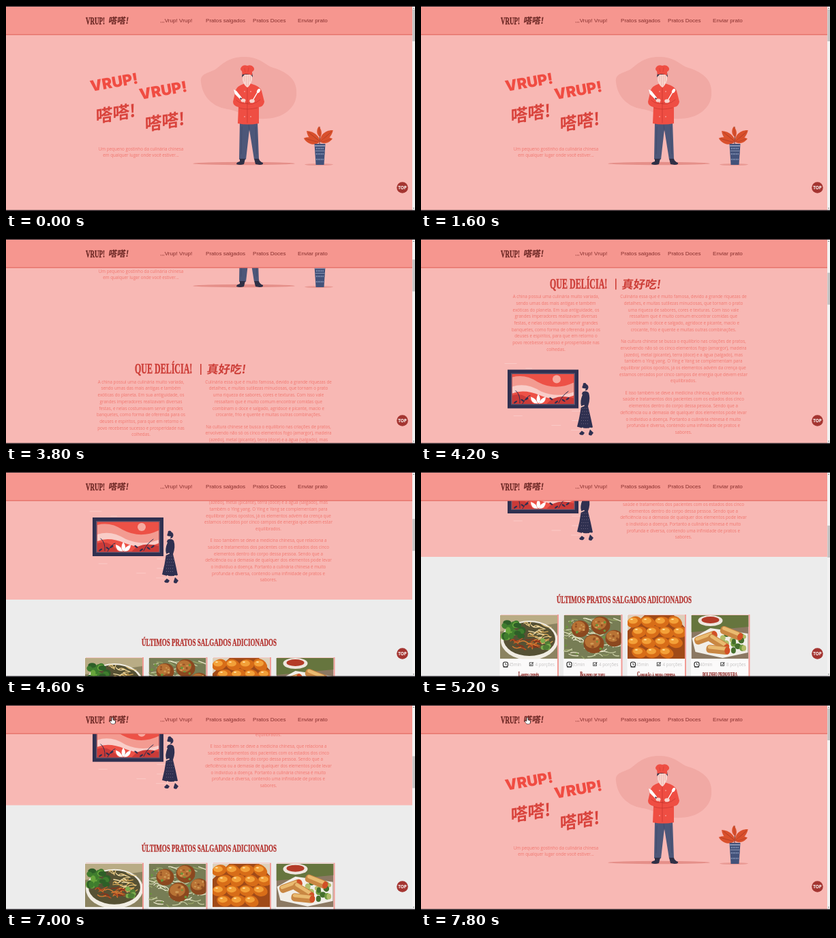
An HTML page for the animation above (8000 ms loop, 600 px wide and 302 px high).

```html
<!DOCTYPE html>
<html lang="pt">
<head>
<meta charset="utf-8">
<style>
html, body { margin: 0; width: 100%; height: 100%; overflow: hidden; background: #f8b8b4; }
svg { display: block; }
#stage { width: 100%; height: 100%; }
.nav { font: 8.125px "Liberation Sans", Arial, sans-serif; fill: #87302e; }
.body { font: 6.25px "Open Sans", sans-serif; fill: #f1776f; text-anchor: middle; }
.info { font: 6.25px "Open Sans", sans-serif; fill: #c3c1c1; }
.west { font-family: "Liberation Serif", Times, serif; font-weight: 700; }
.brush { font-family: "Noto Sans CJK SC", "Noto Sans CJK", sans-serif; font-weight: 900; }
.shout { font: 900 22px Inter, sans-serif; fill: #f04c42; }
.dish { font-variant: small-caps; }
</style>
</head>
<body>
<svg id="stage" viewBox="0 0 600 302"></svg>
<script>
const LOOP = 8000, STEP = 200;

let seed = 7;
const rnd = (a, b) => {
  seed = (seed * 16807) % 2147483647;
  return a + (b - a) * seed / 2147483647;
};
const repeat = (n, fn) => Array.from({ length: n }, (_, i) => fn(i)).join('');
const rect = (x, y, w, h, fill, extra = '') =>
  `<rect x="${x}" y="${y}" width="${w}" height="${h}" fill="${fill}" ${extra}/>`;
const oval = (x, y, rx, ry, fill, extra = '') =>
  `<ellipse cx="${x}" cy="${y}" rx="${rx}" ry="${ry}" fill="${fill}" ${extra}/>`;
const path = (d, fill, extra = '') => `<path d="${d}" fill="${fill}" ${extra}/>`;
const line = (d, color, w = 1, extra = '') =>
  path(d, 'none', `stroke="${color}" stroke-width="${w}" stroke-linecap="round" ${extra}`);
const text = (x, y, cls, str, extra = '') =>
  `<text x="${x}" y="${y}" class="${cls}" ${extra}>${str}</text>`;

// Narrow slab lettering used by the logo and headings
const west = (x, y, size, fill, str, anchor = 'start', cls = '') =>
  `<g transform="translate(${x} ${y}) scale(.6 1)">` +
  text(0, 0, 'west ' + cls, str,
    `font-size="${size}" fill="${fill}" stroke="${fill}" stroke-width="${size / 40}" text-anchor="${anchor}"`) + '</g>';
const brush = (x, y, size, fill, str, turn = 0) =>
  `<g transform="translate(${x} ${y}) rotate(${turn}) skewX(-8)">` +
  text(0, 0, 'brush', str, `font-size="${size}" fill="${fill}"`) + '</g>';
const lines = (x, y, list) =>
  list.map((s, i) => text(x, y + i * 9.7, 'body', s)).join('');

function chef() {
  const red = '#ef4e43', navy = '#4d5779', skin = '#f8d6cf', dark = '#2f3046';
  return path('M286 112C284 98 300 99 309 92C320 83 330 74 352 75C374 76 378 86 392 91C415 98 428 110 426 131C425 151 405 166 380 166C357 168 345 155 325 152C301 148 288 132 286 112Z', '#f1a9a4') +
    oval(349, 232, 75, 2.2, '#e58f89') +
    path('M343 170L369 170L371 226L364 226L357 182L352 226L342 226Z', navy) +
    line('M356 174L357 184M346 178L345 218M366 178L368 218', '#3b4566', .6) +
    path('M343 225L351 225L349 233Q343 235 338 233Q338 230 343 229Z', dark) +
    path('M364 225L371 225Q372 229 377 231Q378 234 372 234L366 233Z', dark) +
    path('M348 115Q354 112 361 115Q372 118 375 125L379 141Q378 148 371 149L371 173Q355 176 340 173L341 149Q333 147 333 141L337 124Q339 118 348 115Z', red) +
    path('M348 99Q354 96 361 100L361 109Q358 118 354 120Q349 117 347 109Z', skin) +
    repeat(4, i => line(`M${349.3 + i * 3} 102L${349.9 + i * 2.7} ${i % 3 ? 117 : 111}`, '#eda49d', .7)) +
    path('M346 105L347 98L361 98L362 105L359 101L350 101Z', dark) +
    path('M347 101L346 96Q342 93 346 89Q349 86 354 88Q360 86 363 90Q366 94 361 97L361 102Q354 99 347 101Z', red) +
    line('M350 92L351 97M356 91L355 97', '#cb372f', .5) +
    line('M354 121L354 172M342 150Q353 154 369 150M338 139Q347 147 359 142M373 138Q361 148 351 143', '#c8362f', .7) +
    repeat(6, i => oval(350 + i % 2 * 9, 126 + (i >> 1) * 16 + (i > 3 ? 5 : 0), .8, .8, '#f9cbc5')) +
    path('M334 123L338 125L346 135L344 138L336 130Z', '#fff') +
    line('M344 136L347 139', dark, 1.7) +
    line('M369 127L362 139', '#fff', 1.4) + oval(370.5, 125, 2.2, 3.5, '#fff', 'transform="rotate(30 370.5 125)"') +
    oval(348, 139, 3.5, 2.6, skin) + oval(361, 140, 3.8, 2.7, skin);
}

function plant() {
  const leaf = (x, y, turn, n = 1) =>
    `<g transform="translate(${x} ${y}) rotate(${turn}) scale(${n})">` +
    path('M0 0C4 -6 14 -7 21 0C14 5 5 5 0 0Z', '#d9502c') + line('M0 0L18 0', '#9e3424', .5) + '</g>';
  return oval(459, 233.6, 21, 1.6, '#e99a94') +
    line('M460 204Q461 190 460 178M460 200L450 193M461 198L470 192', '#7d4032', 1.1) +
    leaf(461, 193, -98, .75) + leaf(461, 200, -141, 1.22) + leaf(461, 200, -42, 1.2) +
    leaf(459, 201, -164, 1.1) + leaf(462, 201, -18, .85) +
    path('M452.5 203L468.5 203L466.5 234L454.5 234Z', '#43527a') +
    rect(453, 205, 15, 2, '#8792b0') + rect(453.6, 213, 14, 1, '#8792b0') +
    repeat(15, i => oval(455.5 + i % 5 * 2.4, 210 + (i / 5 | 0) * 8, .7, 1.2, '#8b9abb'));
}

// The painting and its visitor
function gallery() {
  const navy = '#2f3050', pale = '#f9cdc8';
  return repeat(15, i => line(`M${rnd(123, 230)} ${58 + i * 7}h${rnd(6, 18)}`, '#fbd2ce', .7)) +
    rect(127, 67, 104, 57, navy) + rect(132, 72, 94, 47, '#59506a') + rect(133.5, 73.5, 91, 44, '#ed5146') +
    path('M134 78Q153 73 171 85Q197 99 224 86V101Q197 111 173 99Q149 86 134 96Z', '#f39b91') +
    path('M134 92Q154 85 176 99Q200 109 224 100V105Q199 115 175 105Q151 95 134 102Z', pale) +
    path('M134 117.5V105Q151 99 165 117.5ZM184 117.5Q198 101 224 109V117.5Z', '#cb3b38') +
    oval(199, 81, 6, 6, '#f7aaa0') +
    line('M145 116Q146 104 139 98M202 116Q207 105 216 99M149 117Q155 106 160 105', navy, 1) +
    repeat(9, i => oval(138 + i * 10, 115 - i % 3 * 3, 3, 1.2, navy, `transform="rotate(${i % 2 ? 35 : -35} ${138 + i * 10} 114)"`)) +
    path('M172 117Q167 111 172 103Q178 111 172 117ZM171 117Q161 117 161 107Q169 109 171 117ZM173 117Q183 117 183 107Q175 109 173 117Z', '#fff') +
    oval(240, 88.5, 2.5, 2, navy) + oval(241, 93, 4.5, 4.8, navy) +
    path('M236 94Q235 99 240 99L242 95Z', '#f8c8bf') +
    path('M237 100Q242 97 246 101Q249 110 245 121Q249 137 252 152Q240 155 229 151Q233 136 235 121Q232 110 237 100Z', navy) +
    line('M236 104Q232 113 234 122L239 120', '#f8c8bf', 1.8) +
    repeat(24, i => oval(237 + i % 4 * 3 - (i >> 2) * .35, 124 + (i >> 2) * 4.5, .45, .45, '#b5a2b3')) +
    line('M237 153L237 158M248 153L249 158', '#f8c8bf', 2) +
    path('M236 157L240 160L238 163Q233 164 232 161ZM248 155L253 160L250 164Q245 164 246 161Z', navy);
}

const blobs = (n, x, y, w, h, r, fills) =>
  repeat(n, i => oval(rnd(x, x + w), rnd(y, y + h), rnd(r * .6, r), rnd(r * .5, r), fills[i % fills.length]));
const strands = (n, x, y, w, h, fills) =>
  repeat(n, i => {
    const a = rnd(x, x + w), b = rnd(y, y + h);
    return line(`M${a} ${b}q${rnd(2, 7)} ${rnd(-7, 7)} ${rnd(6, 14)} ${rnd(-3, 5)}`, fills[i % fills.length], 1.3);
  });

const photos = [
  () => rect(0, 0, 84, 64, '#8b8360') + path('M0 0H84V12L0 24Z', '#b9ac85') +
    oval(43, 37, 42, 29, '#f0ece2') + oval(43, 35, 38, 25, '#565134') +
    blobs(28, 6, 9, 28, 24, 6, ['#3f7d2e', '#67a53b', '#2e5f28']) +
    strands(26, 35, 12, 29, 28, ['#e7c781', '#d4a654', '#f1dca6']) +
    strands(24, 15, 36, 37, 16, ['#bd5423', '#dd7d32', '#8c321a']) +
    blobs(10, 60, 37, 13, 12, 4, ['#7cac4c', '#4d7d34']),
  () => rect(0, 0, 84, 64, '#777d55') +
    strands(65, -3, 4, 82, 58, ['#e7e4c8', '#c6cba1', '#96a465']) +
    [[24, 20, 13], [54, 15, 14], [44, 42, 15], [74, 34, 13]].map(([x, y, r]) =>
      oval(x, y, r, r * .94, '#8b481f') + oval(x - 2, y - 3, r * .75, r * .63, '#b87335') +
      blobs(7, x - 7, y - 8, 13, 13, 2, ['#d19b56', '#935023'])).join('') +
    blobs(13, 3, 5, 77, 54, 2, ['#6b963b']),
  () => rect(0, 0, 84, 64, '#a04a18') + path('M0 0H25L0 23ZM84 0V18L68 0Z', '#ddd0bb') +
    repeat(15, i => {
      const x = 10 + i % 4 * 20 + (i >> 2) % 2 * 7, y = 10 + (i >> 2) * 15;
      return oval(x, y, 11, 8, '#d86d18', `transform="rotate(${rnd(-35, 35)} ${x} ${y})"`) +
        oval(x - 2, y - 2, 7, 4.5, '#f3a038') + oval(x - 4, y - 4, 2, 1, '#ffe0a0');
    }),
  () => rect(0, 0, 84, 64, '#8b7862') + path('M0 0H84V17L0 25Z', '#66753e') +
    oval(28, 8, 18, 8, '#eee6df') + oval(28, 7, 13, 5, '#b43b28') +
    path('M1 34L28 19L83 27V55L46 63L6 54Z', '#f1eee8') +
    blobs(18, 45, 28, 33, 24, 5, ['#6f9b3e', '#b3bd6a', '#456f2d']) +
    [[5, 39, -20], [25, 31, 32], [43, 20, 22], [22, 49, 6]].map(([x, y, a]) =>
      `<g transform="translate(${x} ${y}) rotate(${a})">` + rect(0, -6, 34, 12, '#c98743', 'rx="5"') +
      rect(2, -5, 27, 5, '#e9ba70', 'rx="3"') + oval(31, 0, 4, 5.5, '#d25026') + '</g>').join('')
];

const dishes = [
  ['Lamen chinês', 45, 4], ['Bolinho de tofu', 35, 4],
  ['Camarão à moda chinesa', 45, 4], ['BOLINHO PRIMAVERA', 40, 8]
];
const card = ([name, min, portions], i) =>
  `<g transform="translate(${116 + i * 93.5} 688)">` +
  rect(1, -1, 85, 130, '#f19b95') + rect(-.5, -.5, 84.5, 128, '#fbfafa') +
  `<svg width="84" height="64.5">${photos[i]()}</svg>` +
  rect(4.5, 69, 7, 7, '#fff', 'rx="2.5" stroke="#222" stroke-width="1.1"') +
  line('M8 70.5V73H9.5M5 76.5H11', '#222', .8) +
  text(12.5, 75, 'info', min + 'min') +
  rect(43.2, 69.8, 4.8, 4.8, '#fff', 'stroke="#333" stroke-width=".8"') +
  line('M44.2 72L45.4 73.4L48.5 69.5', '#333', .9) +
  text(51.5, 75, 'info', portions + ' porções') +
  west(42, 89.5, i < 3 ? 9.5 : 7.7, '#8f2724', name, 'middle', 'dish') + '</g>';

const page =
  rect(0, 0, 596, 602, '#f8b8b4') + rect(0, 602, 596, 300, '#ececec') +
  [[125, 126, 'VRUP!'], [197, 138, 'VRUP!']].map(([x, y, s]) =>
    text(0, 0, 'shout', s, `transform="translate(${x} ${y}) rotate(-10)"`)).join('') +
  brush(132, 172, 25, '#d9443d', '嗒嗒!', -9) + brush(204, 184, 25, '#d9443d', '嗒嗒!', -9) +
  lines(198, 212.5, ['Um pequeno gostinho da culinária chinesa', 'em qualquer lugar onde você estiver...']) +
  chef() + plant() +
  west(189, 361, 20, '#cd3e38', 'QUE DELÍCIA!') + rect(285, 347, 1.6, 16, '#cd3e38') +
  brush(294, 361, 17, '#cd3e38', '真好吃!') +
  lines(198, 375.7, [
    'A china possui uma culinária muito variada,', 'sendo umas das mais antigas e também',
    'exóticas do planeta. Em sua antiguidade, os', 'grandes imperadores realizavam diversas',
    'festas, e nelas costumavam servir grandes', 'banquetes, como forma de oferenda para os',
    'deuses e espíritos, para que em retorno o', 'povo recebesse sucesso e prosperidade nas', 'colhedas.']) +
  lines(385, 375.7, [
    'Culinária essa que é muito famosa, devido a grande riquezas de', 'detalhes, e muitas sutilezas minuciosas, que tornam o prato',
    'uma riqueza de sabores, cores e texturas. Com isso vale', 'ressaltam que é muito comum encontrar comidas que',
    'combinam o doce e salgado, agridoce e picante, macio e', 'crocante, frio e quente e muitas outras combinações.']) +
  lines(385, 441.7, [
    'Na cultura chinese se busca o equilíbrio nas criações de pratos,', 'envolvendo não só os cinco elementos fogo (amargor), madeira',
    '(azedo), metal (picante), terra (doce) e a água (salgado), mas', 'também o Ying yang. O Ying e Yang se complementam para',
    'equilibrar pólos opostos, já os elementos advém da crença que', 'estamos cercados por cinco campos de energia que devem estar', 'equilibrados.']) +
  lines(385, 517.2, [
    'E isso também se deve a medicina chinesa, que relaciona a', 'saúde e tratamentos dos pacientes com os estados dos cinco',
    'elementos dentro do corpo dessa pessoa. Sendo que a', 'deficiência ou a demasia de qualquer dos elementos pode levar',
    'o indivíduo a doença. Portanto a culinária chinesa é muito', 'profunda e diversa, contendo uma infinidade de pratos e', 'sabores.']) +
  `<g transform="translate(0 414)">${gallery()}</g>` +
  west(298, 670, 15, '#b5332f', 'ÚLTIMOS PRATOS SALGADOS ADICIONADOS', 'middle') +
  dishes.map(card).join('');

const header =
  rect(0, 0, 596, 42, '#f6968f') + rect(0, 41.6, 596, 1.2, '#e36a61') +
  west(117, 26.5, 15, '#692522', 'VRUP!') + brush(150, 26, 12.5, '#692522', '嗒嗒!') +
  [[226, ',,,Vrup! Vrup!'], [293, 'Pratos salgados'], [362, 'Pratos Doces'], [428, 'Enviar prato']]
    .map(([x, s]) => text(x, 24.3, 'nav', s)).join('');

const hand = path('M-1 -4Q0 -5 1 -4V-1L4 0Q5 1 4 4L3 5H-1L-4 1Q-3 0 -1 1Z', '#fff', 'stroke="#222" stroke-width=".6"');

document.getElementById('stage').innerHTML =
  `<g id="page">${page}</g>${header}` +
  oval(581.5, 267.5, 8.3, 8.3, '#a43531') +
  text(581.5, 269.8, '', 'TOP', 'font-family="Open Sans, sans-serif" font-size="6.4" font-weight="700" fill="#fff" text-anchor="middle"') +
  rect(596, 0, 4, 302, '#f3f2f2') + '<rect id="thumb" x="596.3" width="3.7" height="47" fill="#c4c2c2"/>' +
  path('M596.8 4L598 2.4L599.2 4ZM596.8 297.5L598 299L599.2 297.5Z', '#777') +
  rect(0, 0, 600, 1, '#28242a') + rect(0, 300.6, 600, 1.4, '#221e24') +
  `<g id="hand" transform="translate(156 23)">${hand}</g>`;

const [pageEl, thumbEl, handEl] = ['page', 'thumb', 'hand'].map(id => document.getElementById(id));
const keys = [[0, 0], [3280, 0], [3800, 163], [4600, 414], [5200, 477], [5400, 481]];

function scrollAt(t) {
  if (t >= 5400) {
    const p = Math.min(1, Math.max(0, (t - 6900) / 700));
    return 481 * (1 - p * p * (3 - 2 * p));
  }
  const i = keys.findIndex(k => t < k[0]);
  const [t0, y0] = keys[i - 1], [t1, y1] = keys[i];
  return y0 + (y1 - y0) * (t - t0) / (t1 - t0);
}

function draw(now) {
  const t = Math.floor(now % LOOP / STEP) * STEP;
  const y = scrollAt(t);
  pageEl.setAttribute('transform', `translate(0 ${-y})`);
  thumbEl.setAttribute('y', 5 + y * .155);
  handEl.setAttribute('visibility', t >= 6400 ? 'visible' : 'hidden');
}

const start = performance.now();
(function tick() {
  draw(performance.now() - start);
  requestAnimationFrame(tick);
})();
</script>
</body>
</html>
```
